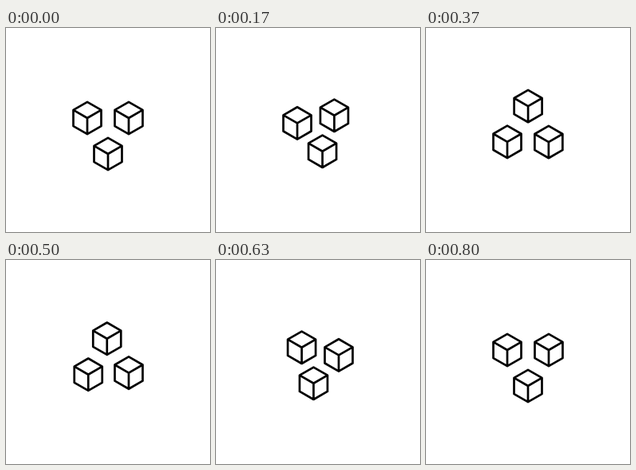
An HTML page for the animation above (830 ms loop, 256 by 256 pixels).

```html
<!DOCTYPE html>
<html>
<head>
<meta charset="utf-8">
<style>
  html, body { margin: 0; height: 100%; overflow: hidden; background: #fff; }
  svg { display: block; width: 100vw; height: 100vh; }
</style>
</head>
<body>
<svg viewBox="0 0 256 256">
  <defs>
    <path id="cube" d="M0-20.2 17.5-10.1V10.1L0 20.2-17.5 10.1V-10.1ZM-17.5-10.1 0 0 17.5-10.1M0 0V20.2"
      fill="none" stroke="#000" stroke-width="2.7" stroke-linejoin="round"/>
  </defs>
  <use href="#cube"/>
  <use href="#cube"/>
  <use href="#cube"/>
</svg>
<script>
const LOOP = 830, STEPS = 12;
const cubes = document.querySelectorAll('use');

// Corners of the hexagon the cubes travel along, counterclockwise.
const corners = [[102, 113], [102, 143], [128, 158], [154, 143], [154, 113], [128, 98]];

// cubic-bezier(.8, 0, .2, 1), solved by bisection
function ease(x) {
  let lo = 0, hi = 1;
  for (let i = 0; i < 24; i++) {
    const s = (lo + hi) / 2, r = 1 - s;
    if (2.4 * s * r * r + 0.6 * s * s * r + s ** 3 < x) lo = s; else hi = s;
  }
  return lo * lo * (3 - 2 * lo);
}

function draw(now) {
  // 30 steps per second, with step starts rounded to 10 ms
  const step = Math.floor((Math.floor(now % LOOP / 10) + 0.5) * 0.3);
  const move = Math.floor(step / STEPS);
  const p = ease(step % STEPS / STEPS);
  cubes.forEach((cube, i) => {
    const from = corners[(2 * i + move) % 6];
    const to = corners[(2 * i + move + 1) % 6];
    const [x, y] = from.map((v, k) => v + (to[k] - v) * p);
    cube.setAttribute('transform', `translate(${x} ${y})`);
  });
  requestAnimationFrame(draw);
}
draw(performance.now());
</script>
</body>
</html>
```
